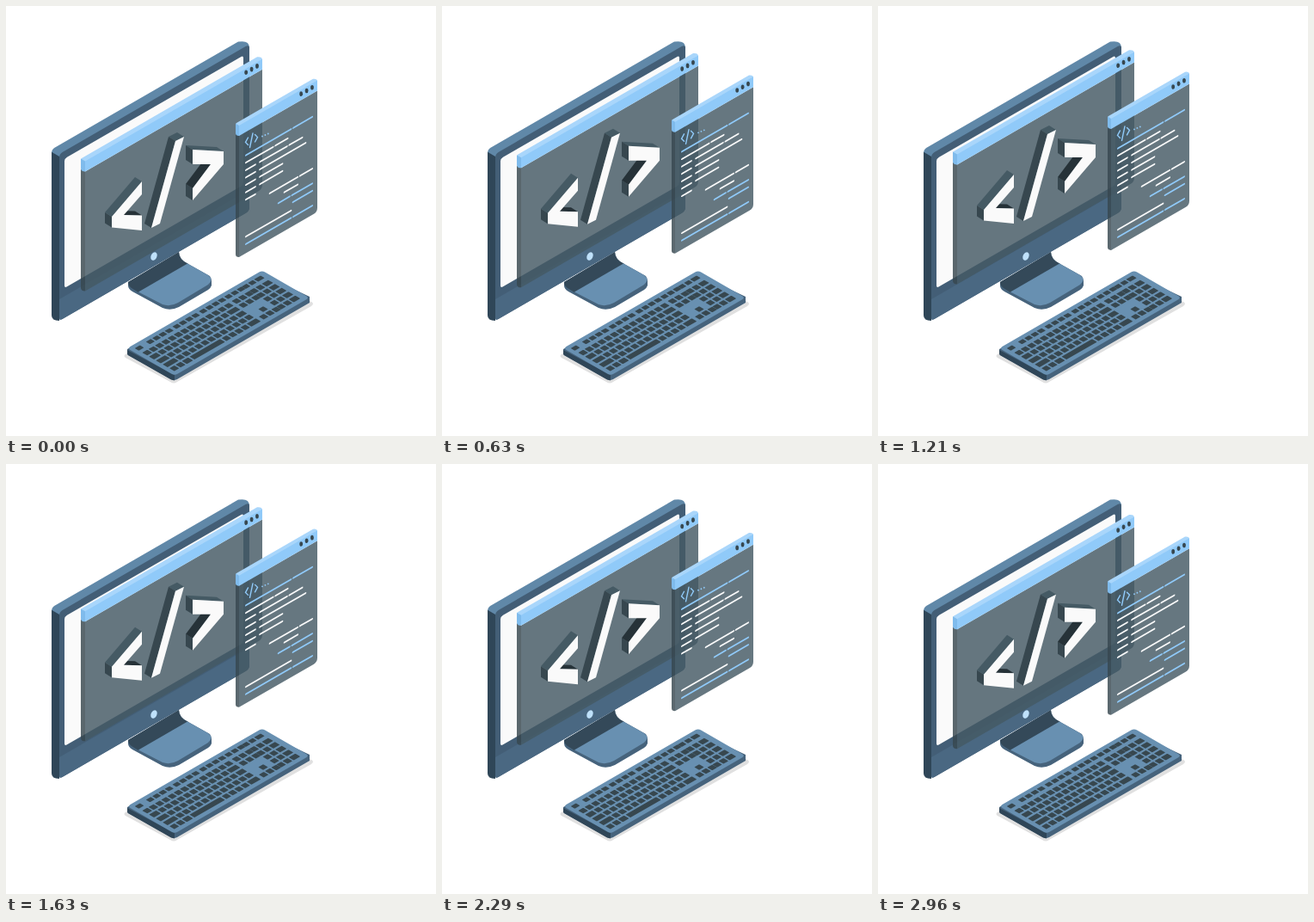
Recreate the animation shown at these times as an HTML page. Size 500 px wide and 500 px high, loop 3 s.

```html
<!DOCTYPE html>
<html lang="en">
<head>
<meta charset="utf-8">
<title>Floating code windows</title>
<style>
html, body { margin: 0; width: 100%; height: 100%; overflow: hidden; background: #fff; }
svg { display: block; width: 100vw; height: 100vh; }
</style>
</head>
<body>
<svg id="stage" viewBox="0 0 500 500"></svg>
<script>
const SLOPE = 0.577;
const INK = '#37474f', BLUE = '#90caf9', WHITE = '#fafafa';
const STEEL = '#6890b1', SHADE = '#46637c', DARK = '#2f4658';

const path = (d, fill, extra = '') => `<path d="${d}" fill="${fill}" ${extra}/>`;
const rect = (x, y, w, h, r, fill) =>
  `<rect x="${x}" y="${y}" width="${w}" height="${h}" rx="${r}" fill="${fill}"/>`;

// Upright isometric plane whose local x axis climbs to the right.
const wall = (x, y, content) =>
  `<g transform="matrix(1 ${-SLOPE} 0 1 ${x} ${y})">${content}</g>`;

// Height gained, in wall coordinates, by going back a given depth.
const rise = depth => -2 * SLOPE * depth;

const topFace = (w, d, r, fill) => path(
  `M0 ${r}L${-d} ${rise(d) + r}q0 ${-r} ${r} ${-r}H${w - d - r}Q${w} ${rise(d) / 2} ${w} ${r}z`, fill);

const leftFace = (y, h, d, fill, extra) => path(
  `M0 ${y}L${-d} ${y + rise(d)}V${h + rise(d) - 1}Q${-d} ${h + rise(d) / 2} 0 ${h}z`, fill, extra);

function monitor() {
  const w = 221, h = 194, chin = 169;
  return wall(62, 172,
    topFace(w, 9, 4, '#6088a8')
    + leftFace(3, h, 9, DARK)
    + rect(0, 0, w, h, 4, '#435e76')
    + path(`M0 ${chin}H${w}V${h - 5}q0 5-5 5H3q-3 0-3-3z`, '#4a6882')
    + rect(6, 9, 208, 150.5, 3, WHITE))
    + '<ellipse cx="172" cy="291" rx="3.4" ry="5" transform="rotate(25 172 291)" fill="#bfe1fb"/>';
}

function stand() {
  return path('M142 321L201 286q0 9 11 14l25 14q2 3 2 6v5q-1 3-4 5L201 350q-10 5-19 1L147 332q-5-3-5-7z', SHADE)
    + path('M142 321L201 286q0 9 11 14L154 333l-8-5q-4-3-4-7z', '#344959')
    + path('M154 332.5L211 299.5l24 13.500q7 5 0 11L200 345q-9 5-18 2z', STEEL);
}

function keyboard() {
  const size = 6.6, gap = 1.8, pitch = size + gap;
  let keys = '';
  // Fills u..end with keys; the last one takes up the remainder.
  const row = (u, end, v, first = size, h = size) => {
    for (let w = first; u < end - 1; w = size) {
      if (end - u - w < pitch - 1) w = end - u;
      keys += rect(u, v, w, h, 0.6, INK);
      u += w + gap;
    }
  };
  const span = n => n * pitch - gap;

  row(5, 12, 5, 7, 5.5);
  for (let i = 0; i < 3; i++) row(20 + 35.5 * i, 20 + 35.5 * i + span(4), 5, size, 5.5);
  for (let r = 0; r < 5; r++) {
    const v = 15.2 + 9.1 * r;
    if (r < 4) row(5, 121, v, size + 2.8 * r);
    if (r < 2) row(125, 125 + span(3), v);
    row(148.500, 174, v);
  }
  row(5, 30, 51.6);
  row(32, 73, 51.6, 41);
  row(75, 121, 51.6);
  row(125, 125 + span(3), 51.6);
  row(125 + pitch, 125 + pitch + size, 42.5);
  row(125, 125 + span(3), 5, size, 5.5);
  row(148.500, 174, 5, size, 5.5);

  return path('M139 405L300 314l55 30q4 2 0 5L199 437q-4 3-8 0L139 409q-3-2 0-4z', '#e0e0e0')
    + path('M141 399L298 312l55 26v7L199 434q-4 2-7 0L142 406q-1-1-1-2z', SHADE)
    + path('M141 400l55 29v6.500l-4-1L142 406q-1-1-1-2z', DARK)
    + `<g transform="matrix(.866 -.5 .866 .5 141 398)">${rect(0, 0, 181, 63.5, 4, STEEL)}${keys}</g>`;
}

// A translucent window; x, y is its front top-left corner.
function pane(x, y, w, h, depth) {
  const head = 12;
  let dots = '';
  for (let i = 0; i < 3; i++) {
    const right = 6 + 6.4 * i;
    dots += `<ellipse cx="${x + w - right}" cy="${y + 4.8 - SLOPE * (w - right)}" rx="1.9" ry="2.8" fill="${INK}"/>`;
  }
  return wall(x, y,
    path(`M0 ${head}H${w}V${h - 5}q0 5-4 5H0z`, '#455a64', 'opacity=".82"')
    + leftFace(head, h, depth, INK, 'opacity=".82"')
    + topFace(w, depth, 1, '#a9d6fb')
    + rect(0, 0, w, head, 0, BLUE)
    + leftFace(0, head, depth, '#7fbbec')) + dots;
}

// Solid glyph from a clockwise outline; edges facing up and left get a side face.
function solid(points, innerEdge) {
  const dx = -8, dy = -5;
  let faces = '';
  points.forEach(([x1, y1], i) => {
    const [x2, y2] = points[(i + 1) % points.length];
    const ex = x2 - x1, ey = y2 - y1;
    if (ey * dx - ex * dy <= 0) return;
    const steep = Math.abs(ey) > 3 * Math.abs(ex);
    const fill = i === innerEdge ? '#263238' : steep ? INK : '#455a64';
    faces += path(`M${x1} ${y1}L${x2} ${y2}l${dx} ${dy}L${x1 + dx} ${y1 + dy}z`, fill);
  });
  return faces + path('M' + points.join('L') + 'z', WHITE);
}

function bigTag() {
  return solid([[158, 204], [158, 219], [137, 243], [158, 243.5], [158, 261], [123, 257.5], [123, 245]], 2)
    + solid([[197, 157], [207, 152], [179, 253], [169, 258]])
    + solid([[217, 167], [253, 169], [253, 184], [217, 226], [217, 212], [238, 184], [217, 184]], 4);
}

function codeLines() {
  const width = 77, pitch = 8.6;
  let lines = '';
  // Ends are fractions of the text width.
  const line = (row, from, to, color = WHITE) => {
    lines += `<path d="M${from * width} ${row * pitch}H${to * width}" stroke="${color}"/>`;
  };
  const split = (row, from, cut, to, color) => {
    line(row, from, cut, color);
    line(row, cut + 0.035, to, color);
  };

  for (const row of [0, 12]) split(row, 0, 0.68, 1, BLUE);
  split(1, 0, 0.41, 0.63);
  for (let row = 2; row < 7; row++) line(row, 0, 0.14);
  split(2, 0.21, 0.62, 0.85);
  line(3, 0.21, 0.9);
  for (const row of [4, 5]) line(row, 0.21, 0.55);
  split(7, 0.36, 0.78, 1);
  line(8, 0.58, 0.78);
  split(9, 0.49, 0.66, 1, BLUE);
  line(10, 0.71, 1, BLUE);
  line(11, 0, 0.68);

  let dots = '';
  for (let i = 0; i < 3; i++) dots += `<circle cx="${298 + i * 3.4}" cy="${151.5 - i * 1.5}" r=".9" fill="${BLUE}"/>`;
  return `<g stroke-width="2" stroke-linecap="round">${wall(279, 173.5, lines)}</g>`
    + path('M281.500 153L278.500 158.500L281.500 161.500M287 148L283.500 164.500M289.500 149.500L292.500 152.500L289.500 158',
      'none', `stroke="${BLUE}" stroke-width="1.4" stroke-linecap="round"`)
    + dots;
}

const stage = document.getElementById('stage');
stage.innerHTML = stand() + monitor() + keyboard()
  + `<g id="float">${pane(92, 180.5, 206, 151, 5)}${bigTag()}${pane(271, 139, 91, 153, 4)}${codeLines()}</g>`;

const float = document.getElementById('float');
const start = performance.now();

function draw() {
  const phase = (performance.now() - start) % 3000 / 1500;
  const lift = 10 * (1 - Math.abs(1 - phase));
  float.setAttribute('transform', `translate(0 ${-lift})`);
  requestAnimationFrame(draw);
}
draw();
</script>
</body>
</html>
```
